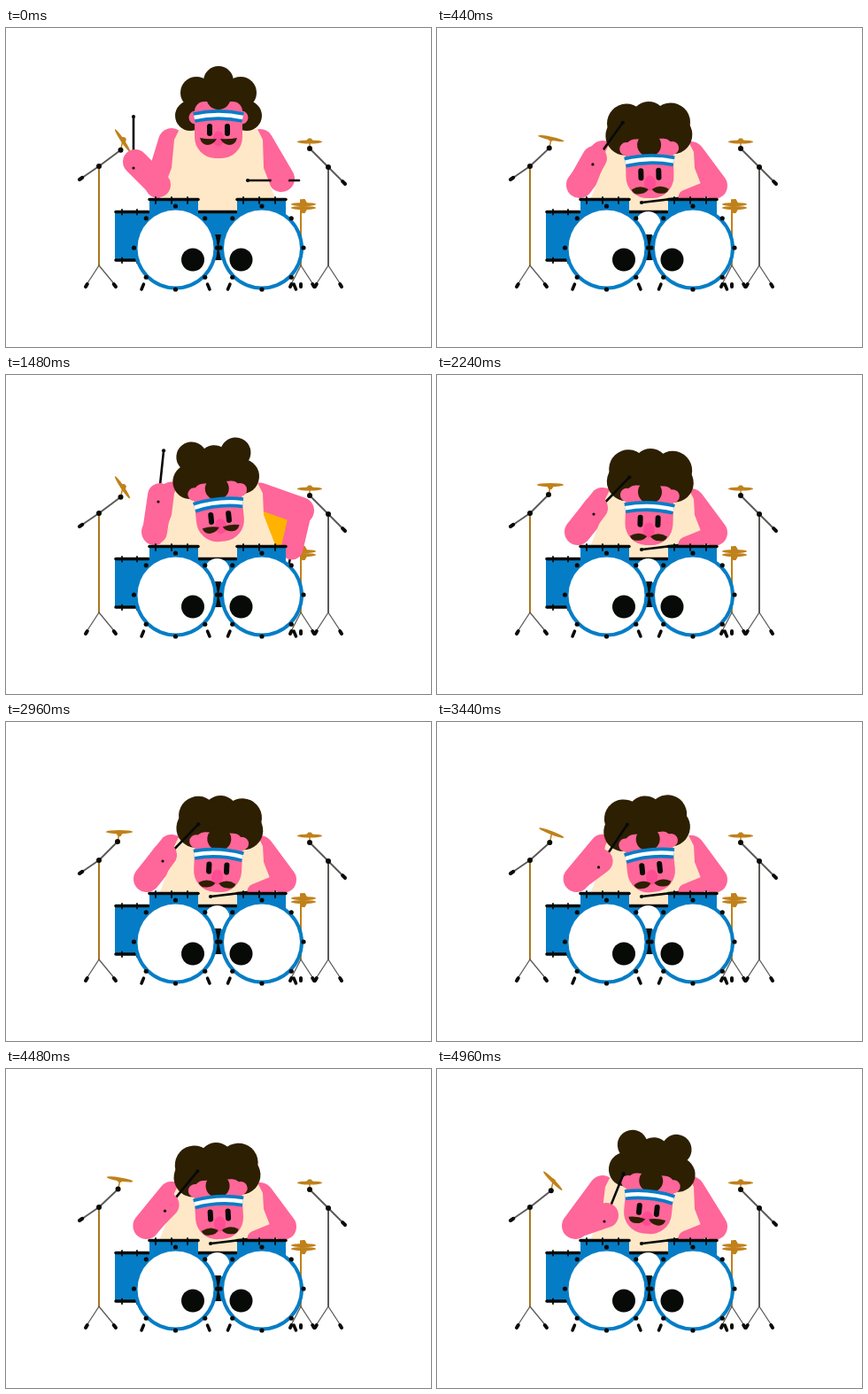
Recreate the animation shown at these times as an HTML page with a canvas. Size 480 px wide and 360 px high, loop 5000 ms.

```html
<!DOCTYPE html>
<html lang="en">
<head>
<meta charset="utf-8">
<title>Drummer</title>
<style>
html, body { margin: 0; width: 100%; height: 100%; overflow: hidden; background: #fff; }
canvas { display: block; }
</style>
</head>
<body>
<canvas id="stage" width="480" height="360"></canvas>
<script>
const c = document.getElementById('stage').getContext('2d');
const LOOP = 5000, STEP = 40, BEATS = 14, STICK = 58;
const BLACK = '#080a08', BLUE = '#057dc6', GOLD = '#c0811a', GREY = '#5c5a58',
  PINK = '#ff6699', NOSE = '#ff4d94', HAIR = '#2d1f02', CREAM = '#fee8c8';

// Right arm poses: elbow, hand, stick tip
const AIR = [311, 170, 308, 172, 273, 172];
const SNARE = [313, 178, 281, 191, 231, 197];
const REACH = [333, 152, 360, 155, 406, 128];
const FOLD = [333, 153, 323, 196, 331, 155];

const clamp = (x, a, b) => Math.min(1, Math.max(0, (x - a) / (b - a)));
const hump = (x, a, b) => Math.sin(Math.PI * clamp(x, a, b));
const ramp = (x, a, b) => { const u = clamp(x, a, b); return u * u * (3 - 2 * u); };
const mix = (a, b, u) => a.map((v, i) => v + (b[i] - v) * u);

function line(color, width, ...pts) {
  c.strokeStyle = color;
  c.lineWidth = width;
  c.lineCap = c.lineJoin = 'round';
  c.beginPath();
  for (let i = 0; i < pts.length; i += 2) c.lineTo(pts[i], pts[i + 1]);
  c.stroke();
}

function poly(color, ...pts) {
  c.fillStyle = color;
  c.beginPath();
  for (let i = 0; i < pts.length; i += 2) c.lineTo(pts[i], pts[i + 1]);
  c.fill();
}

function oval(color, x, y, rx, ry = rx) {
  c.fillStyle = color;
  c.beginPath();
  c.ellipse(x, y, rx, ry, 0, 0, 7);
  c.fill();
}

function rect(color, x, y, w, h, r = 0) {
  c.fillStyle = color;
  c.beginPath();
  c.roundRect(x, y, w, h, r);
  c.fill();
}

function at(x, y, degrees, draw) {
  c.save();
  c.translate(x, y);
  c.rotate(degrees * Math.PI / 180);
  draw();
  c.restore();
}

// Draws once as is and once mirrored
function mirrored(draw) {
  for (const side of [1, -1]) {
    c.save();
    c.scale(side, 1);
    draw();
    c.restore();
  }
}

function tripod(x, y, left, right, color) {
  line(color, 2, x, y, x, 268);
  for (const foot of [left, right]) {
    line(GREY, 1.3, x, 268, foot, 291);
    line(BLACK, 4, foot + (x - foot) * .12, 289, foot, 292);
  }
}

function boom(x, y, jx, jy, ex, ey) {
  line(GREY, 2, jx, jy, x, y, ex, ey);
  line(BLACK, 4, ex + (x - ex) * .15, ey + (y - ey) * .15, ex, ey);
  oval(BLACK, x, y, 3);
  oval(BLACK, jx, jy, 3);
}

function cymbal(x, y, angle, half, dome) {
  at(x, y, angle, () => {
    oval(GOLD, 0, 0, half, 2);
    poly(GOLD, -5, 0, -1.5, dome, 1.5, dome, 5, 0);
  });
}

function stands(swing) {
  const jx = 126 + swing / 16, jy = 135 + swing / 20;
  tripod(105, 155, 90, 124, '#a97720');
  line(GOLD, 1.5, jx, jy, jx + 2, jy - 9);
  boom(105, 156, jx, jy, 83, 171);
  cymbal(jx + 2, jy - 11, swing, 15, 5 - swing / 6);
  tripod(364, 157, 349, 379, GREY);
  line(GOLD, 1.5, 343, 136, 343, 126);
  boom(364, 157, 343, 136, 383, 176);
  cymbal(343, 128.5, 0, 14, -4);
  tripod(333, 194, 321, 348, GOLD);
  line(BLACK, 4, 333, 289, 333, 292);
  cymbal(336, 199, 0, 14, -6);
  cymbal(336, 203, 0, 14, 6);
}

function tom(x) {
  rect(BLUE, x, 194, 55, 30);
  line(BLACK, 3.5, x, 193.5, x + 55, 193.5);
  for (const d of [7, 25, 43]) line(BLACK, 1.8, x + d, 191, x + d, 198);
}

function bass(x, pupil) {
  for (const side of [-1, 1]) line(BLACK, 3.5, x + side * 36, 289, x + side * 38.5, 295);
  oval(BLUE, x, 248.5, 47);
  oval('#fff', x, 248.5, 43);
  for (let i = 0; i < 8; i++) {
    const a = i * Math.PI / 4;
    oval(BLACK, x + Math.cos(a) * 47, 248 + Math.sin(a) * 47, 2.6);
  }
  oval(BLACK, pupil, 261.5, 13);
}

function drums(gap) {
  rect(BLUE, 123, 207, 45, 55);
  for (const [y, end] of [[207.5, 161], [262, 150]]) {
    line(BLACK, 3.5, 124, y, end, y);
    for (const x of [131, 148]) line(BLACK, 1.8, x, y - 2.5, x, y + 3);
  }
  rect(BLUE, 216, 207, 46, 55);
  line(BLACK, 3.5, 217, 207.5, 260, 207.5);
  oval('#fff', 238.5, 221, gap);
  tom(162);
  tom(261);
  poly(BLACK, 236, 233, 243, 233, 240, 248, 243, 262, 236, 262, 239, 248);
  bass(191.5, 211);
  bass(289, 265.5);
}

function hair(top, bow, mid) {
  const crown = 17 + 1.5 * bow;
  oval(HAIR, 0, top + crown, crown);
  oval(HAIR, 0, top + 45 - 5 * bow, 34 - 2 * bow);
  mirrored(() => {
    oval(HAIR, 25, top + 30 - 3 * bow - 16 * mid, 18 + 2 * bow - 3 * mid);
    oval(HAIR, 32 - 2.5 * bow, top + 56 - 9 * bow - 8 * mid, 17 + 2.5 * bow);
  });
}

function band(color, width) {
  c.strokeStyle = color;
  c.lineWidth = width;
  c.lineCap = 'butt';
  c.beginPath();
  c.moveTo(-27.5, 2);
  c.quadraticCurveTo(0, -4, 27.5, 2);
  c.stroke();
}

function moustache(y, curl) {
  c.fillStyle = HAIR;
  c.beginPath();
  c.moveTo(2, y - 1 - curl);
  c.quadraticCurveTo(11, y - 7 + 6 * curl, 21, y - 1 - 2 * curl);
  c.quadraticCurveTo(19, y + 5, 12, y + 4 + curl);
  c.quadraticCurveTo(5, y + 4, 2, y - 1 - curl);
  c.fill();
}

// bow: 0 upright, 1 leaning in, 2 fully down
function head(bow, mid, tilt, bounce) {
  const lean = Math.min(1, bow), crown = -16 - 8 * lean;
  at(240, 99 + 25 * bow + 19 * mid - bounce, tilt, () => {
    hair(-56 - 10 * lean, bow, mid);
    rect(PINK, -27, crown, 54, 48 - 5 * lean - crown, [11, 11, 24, 24]);
    mirrored(() => oval(PINK, 26, 2 - 15 * lean, 7.5));
    oval(HAIR, 0, -20 + 3 * lean, 13.5, 13);
    band(BLUE, 12);
    band('#fff', 4.5);
    oval(NOSE, 0, 26, 6.5, 8.5);
    mirrored(() => {
      rect(BLACK, 7, 9, 6, 14, 3);
      moustache(28 + 3 * bow - 3 * mid, 1 - bow / 2);
    });
  });
}

function stick(bx, by, tx, ty) {
  line(BLACK, 2.6, bx, by, tx, ty);
  oval(BLACK, tx, ty, 2.1);
}

function rightArm(t, lift) {
  const side = mix(REACH, FOLD, ramp(t, 1400, 1480));
  const away = ramp(t, 1320, 1400) - ramp(t, 1490, 1620);
  const [ex, ey, hx, hy, tx, ty] = mix(mix(SNARE, AIR, lift), side, away);
  const a = Math.atan2(hy - ty, hx - tx);
  return { ex, ey, hx, hy, away, stick: [tx + STICK * Math.cos(a), ty + STICK * Math.sin(a), tx, ty] };
}

// Raise the stick, sweep it across, drift down, swing back
function leftArm(raise, sweep, drift, back) {
  const hx = 146 + 28 * raise + 5 * sweep + 12 * drift - 45 * back;
  const hy = 151 - 15 * raise + 14 * sweep + 15 * drift - 14 * back;
  const ex = 172 - 4 * raise - 9 * sweep - 3 * drift + 16 * back;
  const a = (6 * raise + 38 * sweep - 22 * drift - 22 * back) * Math.PI / 180;
  const bx = hx - 2, by = hy + 7;
  return { ex, ey: 177, hx, hy, stick: [bx, by, bx + STICK * Math.sin(a), by - STICK * Math.cos(a)] };
}

function draw(t) {
  const beat = t / LOOP * BEATS % 1;
  const sweep = ramp(beat, .144, .27), drift = ramp(beat, .4, .888), back = ramp(beat, .888, 1);
  const bow = 2 * ramp(beat, .07, .21) - ramp(beat, .6, .888) - back;
  const mid = hump(bow, 0, 2), neck = 114 + 7 * bow;
  const swing = 56 * (1 - sweep) + 45 * drift + 11 * back - 30 * hump(beat, 0, .144);
  const left = leftArm(ramp(beat, 0, .12), sweep, drift, back);
  const right = rightArm(t, hump((beat + .5) % 1, .41, .59));

  c.fillStyle = '#fff';
  c.fillRect(0, 0, 480, 360);
  stands(swing);
  if (right.away > .5) poly('#ffb300', 284, 140, 327, 158, 310, 195, 290, 195);
  line(PINK, 30, 187, neck + 14, left.ex, left.ey);
  line(PINK, 30, 287, neck + 15, right.ex, right.ey);
  poly(CREAM, 196, neck, 284, neck, 290, neck + 12, 291, 158, 310, 207, 168, 207, 187, 158, 190, neck + 12);
  head(bow, mid, -6 * Math.sin(4 * Math.PI * beat), 8 * hump(beat, 0, .1));
  stick(...left.stick);
  line(PINK, 28, left.ex, left.ey, left.hx, left.hy);
  oval(BLACK, left.stick[0], left.stick[1], 1.6);
  stick(...right.stick);
  line(PINK, 17 + 8 * right.away, right.ex, right.ey, right.hx, right.hy);
  drums(14 * Math.min(1, bow));
}

function frame(now) {
  draw(Math.floor(now % LOOP / STEP) * STEP);
  requestAnimationFrame(frame);
}
frame(performance.now());
</script>
</body>
</html>
```
